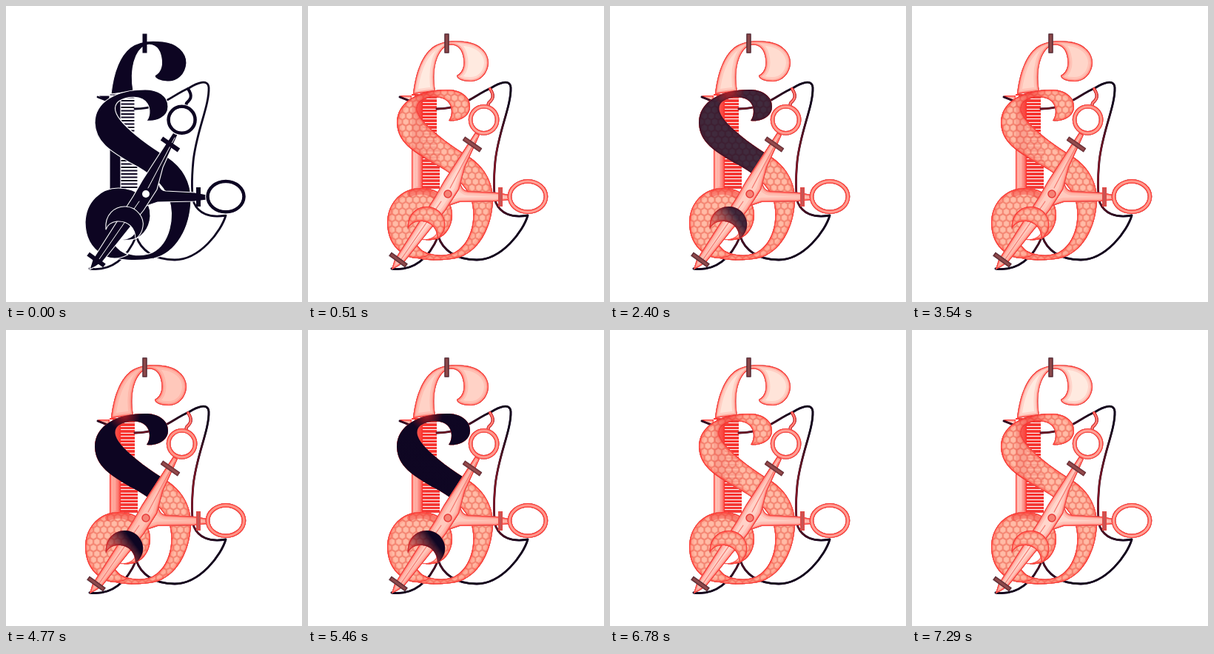
Recreate the animation shown at these times as an HTML page with a canvas. Size 400x400 px, loop 7320 ms.

```html
<!DOCTYPE html>
<html>
<head>
<meta charset="utf-8">
<style>
html, body { margin: 0; width: 100%; height: 100%; overflow: hidden; background: #fff; }
canvas { display: block; }
</style>
</head>
<body>
<canvas id="stage" width="400" height="400"></canvas>
<script>
const ctx = document.getElementById('stage').getContext('2d');
const LOOP = 7320, DARK = '#0d0522', RED = '#ff3a36', SALMON = '#f38876';

const hook = new Path2D('M142 119 C145 92 153 68 168 56 C180 47 197 46 212 48 C231 50 244 62 244 77 C243 93 231 103 218 102 C208 102 201 98 201 94 C211 89 212 77 209 66 C206 54 197 51 189 53 C174 60 167 85 172 115Z');
const body = new Path2D('M190 155 C203 157 219 150 219 136 C219 121 205 113 188 113 C150 113 120 129 120 158 C121 185 143 197 168 212 C190 223 211 238 220 260 C228 285 222 320 198 333 C180 341 160 335 146 326 L130 335 C150 345 180 345 200 341 C230 334 249 300 250 262 C250 235 236 216 218 204 C195 190 172 173 158 158 C147 146 144 136 152 129 C164 121 184 121 191 132 C196 140 194 150 190 155Z');
const curl = new Path2D('M130 336 C112 325 107 308 107 292 C108 264 128 246 152 246 C178 246 196 262 195 284 C194 302 182 315 168 316 C156 318 146 312 146 306 C142 320 150 330 165 336 C150 344 138 341 130 336Z');
const hole = new Path2D('M146 308 C152 294 170 294 175 304 C174 313 160 319 148 314Z');
const crescent = new Path2D('M135 302 C133 282 147 270 162 271 C178 272 187 287 185 298 C184 306 179 312 175 315 C175 300 165 290 150 291 C142 292 137 296 135 302Z');
const blade = new Path2D('M226 171 L232 174 L212 218 L204 248 L186 276 L130 346 L121 352 L113 356 L117 343 L172 257 L184 236Z');
const arm = new Path2D('M210 220 C203 236 206 249 216 250 L255 252 L272 255 V262 L255 264 L205 265 L190 270 L186 254Z');
const ridge = new Path2D('M228 178 L192 246 M180 264 L126 342');
const thread = new Path2D('M124 123 L142 130 M174 139 C210 139 225 120 247 111 C258 104 273 98 274 110 C275 135 257 170 253 210 C251 232 250 252 254 266 C260 280 275 287 297 283 C291 304 262 343 228 343 C200 343 182 330 176 311 M113 355 C143 359 164 340 176 311');
const hanger = new Path2D('M246 112 C253 122 249 127 244 131 L243 136');

const comb = new Path2D('M124 121 H145 L137 131Z M140 119 H155 V250 H140Z');
for (let y = 122; y < 247; y += 4.5) comb.rect(155, y, y < 190 ? 19 : 23, 3);

const pivot = new Path2D();
pivot.arc(189, 254, 5, 0, 7);

const rings = [[237.6, 153.8, 18], [297, 257.6, 24.5, 20.7]].map(([x, y, rx, ry = rx]) => {
  const p = new Path2D();
  for (const d of [2.8, -2.8]) {
    p.moveTo(x + rx + d, y);
    p.ellipse(x, y, rx + d, ry + d, 0, 0, 2 * Math.PI);
  }
  return p;
});

// x, y, length, angle, lit colour
const bars = [[187.5, 50.5, 26, 90, '#6a3338'], [222, 187, 28, 35, '#7a383c'],
  [260, 258, 26, 90, '#e04a48'], [122, 343, 27, 36, '#6a3338']];

const cells = new Path2D();
for (let row = 0; row < 30; row++) {
  for (let col = 0; col < 17; col++) {
    const x = 104 + col * 9.4 + row % 2 * 4.7, y = 108 + row * 8.1;
    for (let k = 0; k < 6; k++) {
      const a = (k + .5) * Math.PI / 3;
      cells[k ? 'lineTo' : 'moveTo'](x + 4.5 * Math.cos(a), y + 4.5 * Math.sin(a));
    }
    cells.closePath();
  }
}

// time, value
const power = [[0, 0], [60, .1], [90, .5], [130, .15], [200, .75], [260, .45], [360, .9], [450, 1], [LOOP, 1]];
const letter = [[0, 1], [1530, 1], [1590, .1], [1640, .4], [1710, .18], [2250, .15], [2500, .25],
  [2580, .1], [2900, 1], [4530, 1], [4620, 0], [5400, 0], [6270, .1], [6550, .2], [6780, 1], [LOOP, 1]];
const heat = [[0, 1], [510, 1], [1710, .75], [3540, .5], [4770, .2], [6270, .7], [7290, 1], [LOOP, 1]];

function level(keys, t) {
  const i = Math.max(1, keys.findIndex(k => k[0] >= t));
  const [t0, a] = keys[i - 1], [t1, b] = keys[i];
  return a + (b - a) * (t - t0) / (t1 - t0);
}

function line(path, color, width) {
  ctx.strokeStyle = color;
  ctx.lineWidth = width;
  ctx.stroke(path);
}

function fill(path, color) {
  ctx.fillStyle = color;
  ctx.fill(path, 'evenodd');
}

function inside(path, draw) {
  ctx.save();
  ctx.clip(path, 'evenodd');
  draw();
  ctx.restore();
}

function faded(alpha, draw) {
  ctx.save();
  ctx.globalAlpha = alpha;
  draw();
  ctx.restore();
}

function part(path, on, color, honey) {
  fill(path, DARK);
  faded(1 - on, () => line(path, '#fff', 1.1));
  faded(on, () => {
    fill(path, color);
    inside(path, () => {
      if (honey) {
        fill(cells, '#ffbba6');
        line(cells, 'rgba(243,120,100,.35)', 1.4);
      }
      line(path, 'rgba(255,80,65,.14)', 12);
      line(path, 'rgba(255,70,58,.28)', 6);
      line(path, RED, 2.4);
    });
  });
}

function shade(path, amount, x0, y0, x1, y1) {
  const g = ctx.createLinearGradient(x0, y0, x1, y1);
  g.addColorStop(0, DARK);
  g.addColorStop(1, 'rgba(140,10,25,.35)');
  faded(amount, () => fill(path, g));
}

function drawThread(on) {
  line(thread, DARK, 2.8);
  const g = ctx.createRadialGradient(180, 220, 70, 180, 220, 125);
  g.addColorStop(0, '#861525');
  g.addColorStop(1, '#15051c');
  faded(on, () => line(thread, g, 2.4));
}

function drawBar([x, y, length, angle, color], on) {
  ctx.save();
  ctx.translate(x, y);
  ctx.rotate(angle * Math.PI / 180);
  const box = (style, inset) => {
    ctx.fillStyle = style;
    ctx.fillRect(inset - length / 2, inset - 3, length - 2 * inset, 6 - 2 * inset);
  };
  box(DARK, 0);
  ctx.globalAlpha = on;
  box(color, 0);
  ctx.globalAlpha = on * .5;
  box('#b06060', 1.6);
  ctx.restore();
}

function render(t) {
  const on = level(power, t), lit = level(letter, t), hot = level(heat, t);
  const off = (1 - lit) * on;
  const pale = `rgb(255,${192 + 42 * hot},${178 + 46 * hot})`;
  const core = `rgb(255,${190 + 24 * hot},${176 + 28 * hot})`;
  ctx.fillStyle = '#fff';
  ctx.fillRect(0, 0, 400, 400);
  ctx.lineJoin = ctx.lineCap = 'round';

  part(hook, on, pale);
  part(comb, on, pale);

  // The comb glows redder behind the letter and between its teeth.
  const g = ctx.createLinearGradient(142, 0, 160, 0);
  g.addColorStop(0, 'rgba(255,50,45,0)');
  g.addColorStop(1, 'rgba(245,45,42,.85)');
  faded(on, () => {
    fill(comb, g);
    inside(new Path2D('M144 119 H176 V180 H144Z'), () => fill(comb, 'rgba(250,50,45,.7)'));
  });

  drawThread(on);
  part(body, on, SALMON, true);

  // The upper stroke goes dark only left of the scissors.
  inside(new Path2D('M100 100 H260 L228 175 L185 250 H100Z'), () => {
    faded(.5 * on * lit, () => inside(body, () => fill(comb, 'rgba(225,45,45,.35)')));
    shade(body, off, 0, 285, 0, 316);
    const glow = ctx.createRadialGradient(160, 115, 2, 160, 115, 22);
    glow.addColorStop(0, 'rgba(240,35,35,.75)');
    glow.addColorStop(1, 'rgba(240,35,35,0)');
    faded(on * .8, () => fill(body, glow));
  });

  part(curl, on, SALMON, true);
  faded(on, () => inside(curl, () => line(new Path2D('M138 254 C152 247 172 252 184 268'), 'rgba(240,45,42,.4)', 8)));
  fill(hole, '#fff');
  faded(on, () => line(hole, RED, 1));

  part(arm, on, core);
  part(blade, on, core);
  line(ridge, '#fff', 1);
  faded(on, () => line(ridge, '#f4685e', 1.1));

  fill(pivot, '#fff');
  faded(on, () => {
    fill(pivot, '#f58275');
    line(pivot, '#e83a38', 1.5);
  });

  part(crescent, on, SALMON, true);
  shade(crescent, off, 172, 286, 148, 304);

  line(hanger, DARK, 4);
  faded(on, () => {
    line(hanger, '#ef3a3a', 4);
    line(hanger, '#ff9a8c', 1.3);
  });
  rings.forEach(r => part(r, on, core));
  bars.forEach(b => drawBar(b, on));
}

function tick() {
  render(performance.now() % LOOP);
  requestAnimationFrame(tick);
}
tick();
</script>
</body>
</html>
```
